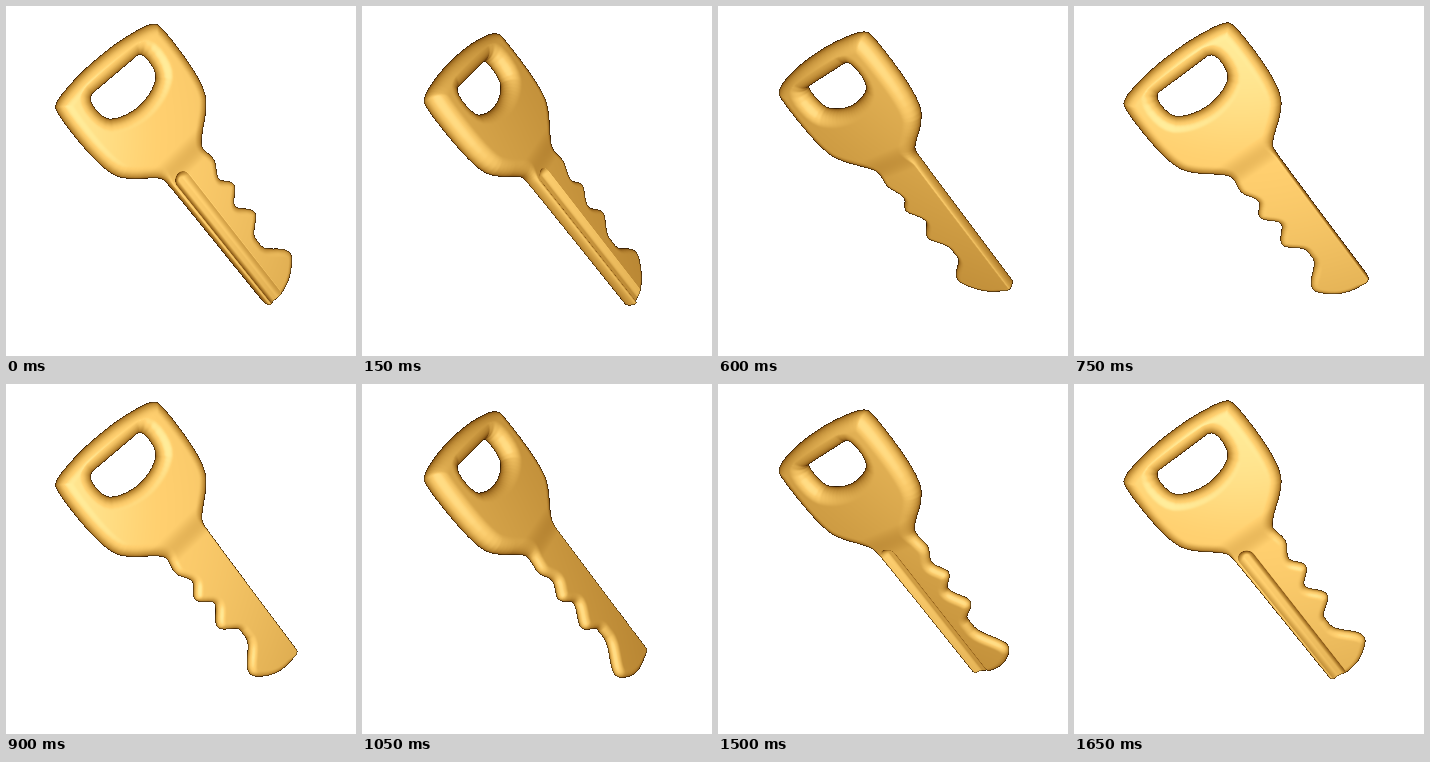
Animation, 350 px wide and 350 px high, one loop 1800 ms. Source, as an HTML page with a canvas:

```html
<!DOCTYPE html>
<html lang="en">
<head>
<meta charset="utf-8">
<title>Turning key</title>
<style>
  html, body { margin: 0; width: 100%; height: 100%; overflow: hidden; background: #fff; }
  canvas { display: block; width: 350px; height: 350px; }
</style>
</head>
<body>
<canvas id="stage" width="350" height="350"></canvas>
<script>
const SIZE = 350, MID = 175, STEPS = 12, STEP_MS = 150, RAD = Math.PI / 180;
const CAMERA = 500, LEAN = 20 * RAD, SLANT = 51.6 * RAD, OFFSET = 13.3;
const START = 16, TURN = 360 / STEPS;
const SPINE = -25.2, BOW_HIGH = 12.5, BLADE_HIGH = 7;

const mix = (a, b, t) => a + (b - a) * t;
const clamp = (x, a, b) => Math.min(b, Math.max(a, x));
const smooth = (a, b, x) => { const t = clamp((x - a) / (b - a), 0, 1); return t * t * (3 - 2 * t); };
const dot = (a, b) => a[0] * b[0] + a[1] * b[1] + a[2] * b[2];

// Key points as [length, width] from the turning axis
const BOW = [[-142, 14], [-140, 36], [-136, 58], [-130, 64], [-82, 66], [-52, 62], [-38, 51], [-26, 36], [-17, 26.5]];
const HOLE = [[-122, 18], [-122, 35.5], [-97, 35.5], [-88.5, 23], [-84.5, 7]];
const TEETH = [[-12, 24.5], [5, 27], [25, 18.5], [41, 28.5], [60, 14.5], [82, 28.5], [103, 11], [117, 11], [150, 33.5]];
const TIP = [[157, 31], [172, 15], [178.5, -6], [175, SPINE], [168, SPINE], [-6, SPINE]];

const mirror = pts => pts.map(([u, v]) => [u, -v]).reverse();

function eased(keys) {
  const pts = [];
  for (let i = 1; i < keys.length; i++)
    for (let n = 0; n < 5; n++) {
      const [u1, v1] = keys[i - 1], [u2, v2] = keys[i];
      pts.push([mix(u1, u2, n / 5), mix(v1, v2, smooth(0, 1, n / 5))]);
    }
  return [...pts, keys[keys.length - 1]];
}

// Closed loop with cut corners, as wall segments
function loop(pts) {
  const next = i => pts[(i + 1) % pts.length];
  for (let pass = 0; pass < 2; pass++) {
    pts = pts.flatMap((a, i) => [.25, .75].map(t => [mix(a[0], next(i)[0], t), mix(a[1], next(i)[1], t)]));
  }
  return pts.map((a, i) => [...a, ...next(i)]);
}
const walls = [
  ...loop([...BOW, ...eased(TEETH), ...TIP, ...mirror(BOW)]),
  ...loop([...HOLE, ...mirror(HOLE)])
];

function inset(u, v) {
  let best = 1e9, inside = false;
  for (const [x1, y1, x2, y2] of walls) {
    const dx = x2 - x1, dy = y2 - y1;
    const t = clamp(((u - x1) * dx + (v - y1) * dy) / (dx * dx + dy * dy), 0, 1);
    const a = x1 + dx * t - u, b = y1 + dy * t - v;
    best = Math.min(best, a * a + b * b);
    if ((y1 > v) !== (y2 > v) && u < x1 + dx * (v - y1) / dy) inside = !inside;
  }
  return Math.sqrt(best) * (inside ? 1 : -1) + .6;
}

// Squared half thickness on a grid, one unit per cell
const U0 = -180, V0 = -80, NU = 380, NV = 160;
function bulge(u, v) {
  const blade = smooth(-34, -4, u);
  const high = mix(BOW_HIGH, BLADE_HIGH, blade);
  const round = mix(13, mix(2, 8, smooth(-22, -8, v)), blade);
  const q = 1 - clamp(inset(u, v) / round, -2, 1);
  return high * high * (1 - q * q);
}
const raw = new Float32Array(NU * NV), grid = new Float32Array(NU * NV).fill(-50);
for (let k = 0; k < raw.length; k++) raw[k] = bulge(U0 + k % NU, V0 + Math.floor(k / NU));
for (let k = NU; k < raw.length - NU; k++)
  grid[k] = raw[k] * .4 + (raw[k - 1] + raw[k + 1] + raw[k - NU] + raw[k + NU]) * .15;

// Negative inside the key
function solid(u, v, w) {
  const x = clamp(u - U0, 0, NU - 2), y = clamp(v - V0, 0, NV - 2);
  const i = x | 0, j = y | 0, a = x - i, k = j * NU + i;
  const q = mix(mix(grid[k], grid[k + 1], a), mix(grid[k + NU], grid[k + NU + 1], a), y - j);
  let f = w * w - q;
  if (w > 0 && u > -26) {
    // groove along the front of the blade
    const out = Math.max(0, Math.hypot(Math.min(u + 3, 0), v + 13.5) - 2);
    f = Math.max(f, 10 * (w - 1.5 - .13 * out * out));
  }
  return f;
}

// Key axes in view space: length, width, thickness
function axes(deg) {
  const c = Math.cos(deg * RAD), s = Math.sin(deg * RAD);
  const ax = Math.cos(SLANT), ay = Math.sin(SLANT), cl = Math.cos(LEAN), sl = Math.sin(LEAN);
  const side = [ay, -ax, 0], up = [ax * sl, ay * sl, cl];
  return [
    [ax * cl, ay * cl, -sl],
    side.map((p, i) => p * c - up[i] * s),
    side.map((p, i) => p * s + up[i] * c)
  ];
}
const eye = [-Math.sin(SLANT) * OFFSET, Math.cos(SLANT) * OFFSET, CAMERA];

function ray(x, y, key) {
  const d = [x - MID, y - MID, -CAMERA], n = Math.hypot(...d);
  return { o: key.map(e => dot(eye, e)), d: key.map(e => dot(d, e) / n) };
}

const LOW = [U0 + 2, V0 + 2, -BOW_HIGH - .5], HIGH = [U0 + NU - 3, V0 + NV - 3, BOW_HIGH + .5];
function hit({ o, d }) {
  const step = .6;
  let near = 0, far = 1e9;
  for (let k = 0; k < 3; k++) {
    const a = (LOW[k] - o[k]) / d[k], b = (HIGH[k] - o[k]) / d[k];
    near = Math.max(near, Math.min(a, b));
    far = Math.min(far, Math.max(a, b));
  }
  const at = t => solid(o[0] + d[0] * t, o[1] + d[1] * t, o[2] + d[2] * t);
  for (let t = near; t < far; t += step) {
    if (at(t) >= 0) continue;
    let a = t - step, b = t;
    for (let n = 0; n < 6; n++) {
      const m = (a + b) / 2;
      if (at(m) < 0) b = m; else a = m;
    }
    return b;
  }
  return -1;
}

// Gold that turns redder as it darkens, with a sheen when the key faces us
function tint(light, face) {
  const glow = face * smooth(.66, .95, light), shine = face * smooth(.92, 1, light);
  return [
    250 * light ** .47 + 16 * glow,
    203 * light ** .64 + 16 * glow + 20 * shine,
    108 * light ** 1.15 + 14 * glow + 36 * shine
  ];
}

function shade({ o, d }, t, face) {
  const p = o.map((k, i) => k + d[i] * t), h = .7;
  const n = p.map((_, i) => {
    const a = p.slice(), b = p.slice();
    a[i] += h;
    b[i] -= h;
    return solid(...a) - solid(...b);
  });
  return tint(clamp(-dot(n, d) / (Math.hypot(...n) || 1), .08, 1), face);
}

const ctx = document.getElementById("stage").getContext("2d");

function render(step) {
  const deg = START + TURN * step, key = axes(deg), face = Math.cos(deg * RAD) ** 2;
  const image = ctx.createImageData(SIZE, SIZE), px = image.data;
  const mask = new Uint8Array(SIZE * SIZE);
  px.fill(255);
  for (let y = 10; y < 315; y++)
    for (let x = 40; x < 310; x++) {
      const r = ray(x + .5, y + .5, key), t = hit(r);
      if (t < 0) continue;
      const k = y * SIZE + x;
      mask[k] = 1;
      px.set(shade(r, t, face), k * 4);
    }
  // thin dark rim
  for (let k = SIZE; k < mask.length - SIZE; k++)
    if (mask[k] && !(mask[k - 1] && mask[k + 1] && mask[k - SIZE] && mask[k + SIZE]))
      for (let c = 0; c < 3; c++) px[k * 4 + c] *= .65;
  return image;
}

const views = Array.from({ length: STEPS }, (_, i) => render(i));
let shown = -1, began = null;
function draw(now) {
  if (began === null) began = now;
  const step = Math.floor((now - began) / STEP_MS) % STEPS;
  if (step !== shown) ctx.putImageData(views[step], 0, 0);
  shown = step;
  requestAnimationFrame(draw);
}
ctx.putImageData(views[0], 0, 0);
requestAnimationFrame(draw);
</script>
</body>
</html>
```
